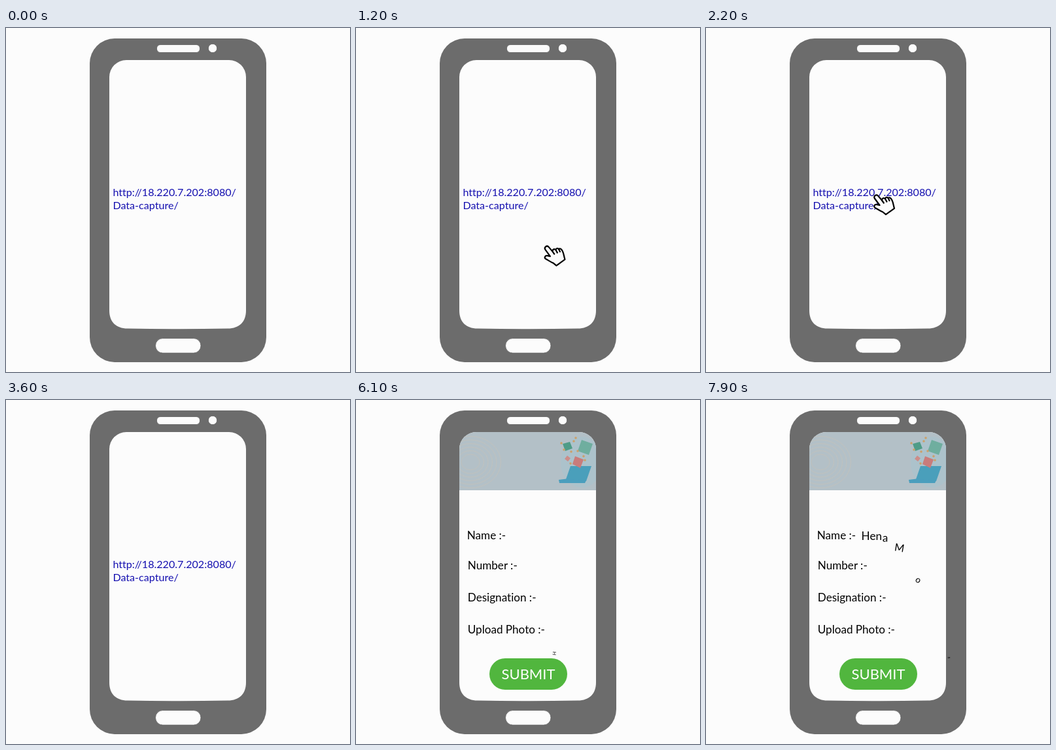
These frames come from a looping animation (526 px wide and 526 px high, 8 s). An HTML page:

```html
<!DOCTYPE html>
<html lang="en">
<head>
<meta charset="utf-8">
<title>Form on a phone</title>
<style>
  html, body { margin: 0; width: 100%; height: 100%; overflow: hidden; background: #fcfcfc; }
  svg { display: block; width: 100%; height: 100%; }
  text {
    font-family: Lato, "Open Sans", sans-serif; font-size: 17.1px;
    font-variant-ligatures: none; white-space: pre;
  }
  .link { font-size: 16.1px; fill: #1510b0; }
  .submit { font-size: 22px; fill: #fff; text-anchor: middle; }
  .letter { text-anchor: middle; }
</style>
</head>
<body>
<svg viewBox="0 0 526 526">
  <defs>
    <path id="screen" d="M184 49H341A26 26 0 0 1 367 75V432C367 449 357 459.500 339 459.500Q263 461 186 459.500C168 459.500 158 449 158 432V75A26 26 0 0 1 184 49Z"/>
    <clipPath id="clip"><use href="#screen"/></clipPath>
  </defs>

  <rect x="128" y="16" width="270" height="495" rx="38" fill="#6c6c6c"/>
  <use href="#screen" fill="#fcfcfc"/>
  <g fill="#fcfcfc" stroke="#5c5c5c" stroke-width=".8">
    <rect x="230.500" y="25.500" width="66" height="12" rx="5.500"/>
    <circle cx="316" cy="31" r="6.700"/>
    <rect x="228.500" y="474.500" width="69.500" height="22.500" rx="11.200"/>
  </g>

  <g id="link">
    <text class="link" x="163.400" y="257">http://18.220.7.202:8080/</text>
    <text class="link" x="163.400" y="276.500">Data-capture/</text>
  </g>

  <g id="form">
    <g clip-path="url(#clip)">
      <rect x="158" y="49" width="209" height="89" fill="#b3c0c7"/>
      <g id="arcs" fill="none" stroke="#c0c1bd" stroke-width="1"/>
      <ellipse cx="345" cy="95" rx="32" ry="39" fill="#a9c3cf" opacity=".6"/>
      <path d="M328 101H360L352 124H320Z" fill="#4a9fbb"/>
      <path d="M310 122L322 120.500L352 123L350 127H311Z" fill="#4a9ebd"/>
      <path d="M316 67L327 64L331 74L320 78Z" fill="#4f9c87"/>
      <path d="M345 61L362 67L356 84L339 78Z" fill="#6fae9f"/>
      <path d="M335 86L348 91L343 104L331 98Z" fill="#c97c7b"/>
      <path d="M323 85L328 89L324 94L319 90Z" fill="#cd8d89"/>
      <g id="dots" fill="#cda068"/>
    </g>
    <text x="169.800" y="213">Name :-</text>
    <text x="170.800" y="259">Number :-</text>
    <text x="170.800" y="308">Designation :-</text>
    <text x="170.800" y="357">Upload Photo :-</text>
    <rect x="204" y="395" width="119" height="48" rx="24" fill="#51b63e"/>
    <text class="submit" x="263.500" y="427">SUBMIT</text>
    <g id="typed"></g>
  </g>

  <g id="pointer">
    <g id="hand" stroke="#000" stroke-width="2.200" stroke-linejoin="round" stroke-linecap="round">
      <path fill="#fcfcfc" d="M9.500 17L1.800 6.500C0 3 4-.2 7 2.500L13 9.500C13 6.200 16 5 18 7.200C18.500 4.500 21 4.200 22.500 6C25 4 27 6.500 28.500 9.500C30.300 13 30.500 17 32 21.800L19 31.200L14.500 27.500C11 26 6 22.800 3 21.200C-.2 19.300 1.500 15.500 5 16Z"/>
      <path fill="none" d="M13 9.500L15.800 13.500M18 7.200L20.400 11.500M22.500 6L24.500 10"/>
    </g>
    <g id="rays" stroke="#000" stroke-width="1.600" stroke-linecap="round"/>
  </g>
</svg>
<script>
const NS = 'http://www.w3.org/2000/svg';
const LOOP = 8000, STEP = 100;
const $ = id => document.getElementById(id);
const clamp = v => Math.min(1, Math.max(0, v));

function add(parent, tag, attrs) {
  const el = document.createElementNS(NS, tag);
  for (const k in attrs) el.setAttribute(k, attrs[k]);
  return parent.appendChild(el);
}

// Header decoration
for (let i = 0; i < 6; i++) {
  const r = 14 + i * 6.5;
  add($('arcs'), 'ellipse', { cx: 175, cy: 95, rx: r, ry: r * 0.85 });
}
[[314, 66], [333, 63], [336, 58], [329, 79], [339, 78], [350, 92], [328, 97], [348, 86], [318, 76]]
  .forEach(([cx, cy]) => add($('dots'), 'circle', { cx, cy, r: 1.8 }));

// Click rays around the fingertip
const rays = [-15, -60, -105, -150, -200].map(deg => {
  const a = deg * Math.PI / 180;
  return { el: add($('rays'), 'line', {}), dx: Math.cos(a), dy: Math.sin(a) };
});

// Typed letters fly in from the lower right
const FLY = { start: 5995, gap: 302, time: 1580, power: 4.5, dx: 80, dy: 243 };
const pen = document.createElement('canvas').getContext('2d');
pen.font = '17.1px Lato, "Open Sans", sans-serif';
const NAME = 'Hena Mos';
const letters = [];
[...NAME].forEach((ch, i) => {
  if (ch === ' ') return;
  const left = pen.measureText(NAME.slice(0, i)).width;
  const right = pen.measureText(NAME.slice(0, i + 1)).width;
  const el = add($('typed'), 'text', { class: 'letter', y: 5 });
  el.textContent = ch;
  letters.push({ el, x: 237.6 + (left + right) / 2, start: FLY.start + letters.length * FLY.gap });
});

function show(el, on) {
  el.setAttribute('visibility', on ? 'visible' : 'hidden');
}

function drawPointer(t) {
  show($('pointer'), t >= 100 && t < 3600);
  $('pointer').setAttribute('opacity', t >= 3500 ? 0.5 : 1);
  const u = clamp((t - 100) / 2100);
  $('hand').setAttribute('transform', `translate(${322 - 66 * u} ${418 - 164 * u})`);
  const g = clamp((t - 2400) / 700);
  $('rays').setAttribute('opacity', g > 0 ? 1 : 0);
  for (const { el, dx, dy } of rays) {
    const far = 7 + 7 * g;
    el.setAttribute('x1', 256 + dx * 7);
    el.setAttribute('y1', 254.5 + dy * 7);
    el.setAttribute('x2', 256 + dx * far);
    el.setAttribute('y2', 254.5 + dy * far);
  }
}

function drawLetters(t) {
  for (const { el, x, start } of letters) {
    const rest = Math.pow(1 - clamp((t - start) / FLY.time), FLY.power);
    el.setAttribute('display', t >= start ? 'inline' : 'none');
    el.setAttribute('transform',
      `translate(${x + FLY.dx * rest} ${209 + FLY.dy * rest}) rotate(${130 * rest}) scale(${1 - 0.8 * rest})`);
  }
}

function draw(now) {
  const t = Math.floor((now % LOOP) / STEP) * STEP;
  show($('link'), t < 4700);
  show($('form'), t >= 4700);
  drawPointer(t);
  drawLetters(t);
}

const t0 = performance.now();
function tick() {
  draw(performance.now() - t0);
  requestAnimationFrame(tick);
}
tick();
</script>
</body>
</html>
```
